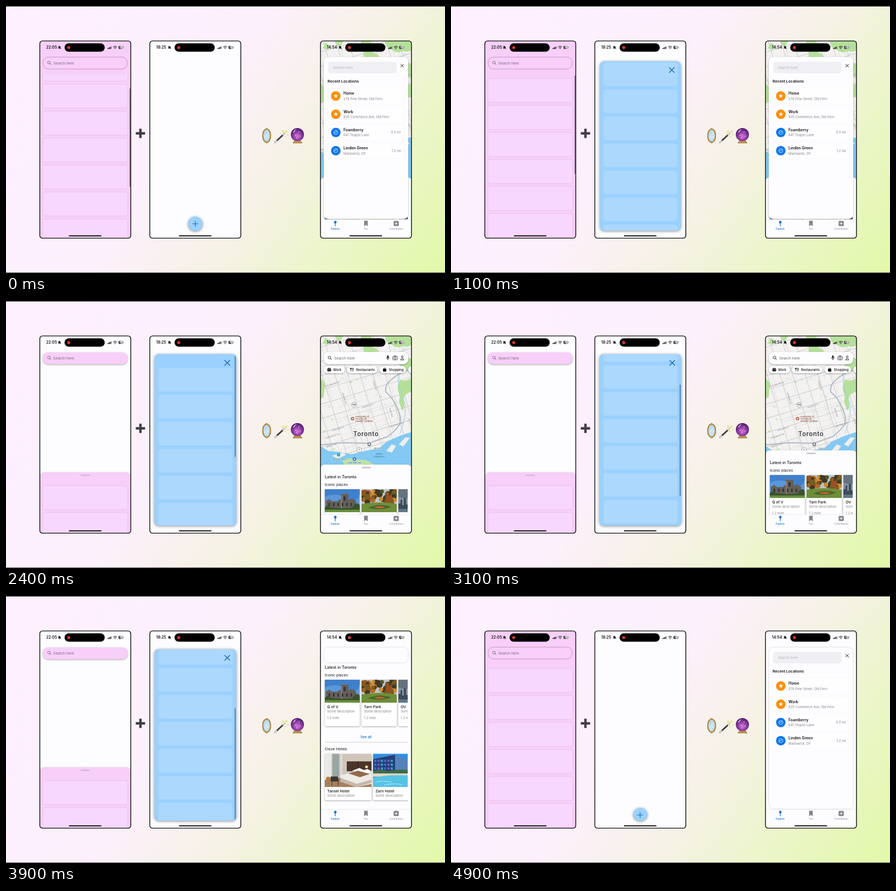
Recreate the animation shown at these times as an HTML page. Size 800x488 px, loop 5000 ms.

```html
<!DOCTYPE html>
<html lang="en">
<head>
<meta charset="utf-8">
<title>Sheets and search</title>
<style>
html, body { margin: 0; width: 100%; height: 100%; overflow: hidden; }
body { background: linear-gradient(125deg, #fef0ff 0, #fdf0fd 42%, #f5f2e3 64%, #ebf6c8 80%, #e2f8a8 100%); }
svg { display: block; }
text { font-family: Inter, "Noto Sans", sans-serif; white-space: pre; }
.sh { filter: drop-shadow(0 1px 1.5px #0005); }
.soft { filter: drop-shadow(0 .5px 1px #0002); }
</style>
</head>
<body>
<svg id="stage" width="800" height="488" viewBox="0 0 800 488"></svg>
<script>
const LOOP = 5000, STEP = 100;
const INK = '#111114', GREY = '#85858b', BLUE = '#0a72d8';

// ---- markup helpers
const rect = (x, y, w, h, r, fill, more = '') =>
  `<rect x="${x}" y="${y}" width="${w}" height="${h}" rx="${r}" fill="${fill}" ${more}/>`;
const circle = (x, y, r, fill, more = '') => `<circle cx="${x}" cy="${y}" r="${r}" fill="${fill}" ${more}/>`;
const path = (d, fill, more = '') => `<path d="${d}" fill="${fill}" ${more}/>`;
const line = (d, color, w, more = '') => `<path d="${d}" fill="none" stroke="${color}" stroke-width="${w}" ${more}/>`;
const text = (x, y, size, str, fill = INK, weight = 400, more = '') =>
  `<text x="${x}" y="${y}" font-size="${size}" fill="${fill}" font-weight="${weight}" ${more}>${str}</text>`;
const MID = 'text-anchor="middle"', END = 'text-anchor="end"', ROUND = 'stroke-linecap="round"';
const group = (id, body, more = '') => `<g id="${id}" ${more}>${body}</g>`;
const repeat = (n, fn) => Array.from({ length: n }, (_, i) => fn(i)).join('');

let seed = 41;
const rnd = () => (seed = seed * 16807 % 2147483647) / 2147483647;
const pick = list => list[Math.floor(rnd() * list.length)];

// ---- phone frame and status bar, drawn at the first phone's place
const glass = (x, y, color) =>
  circle(x, y, 2.5, 'none', `stroke="${color}" stroke-width=".8"`) +
  line(`M${x + 1.9} ${y + 1.9}l2 2`, color, .9, ROUND);

function status(time, charge) {
  const bell = path('M94.6 77.4q1-.8 1-2.2q.1-2 1.8-2.2q1.8.2 1.9 2.2q0 1.4 1 2.2zM96.6 77.9h1.7l-.8.8z', INK) +
    line('M94.7 72.8l5.6 5.8', INK, .7);
  const bars = repeat(4, i => rect(185 + i * 2.1, 76.8 - i * 1.1, 1.5, 1.8 + i * 1.1, .4, i > 2 ? '#8a878d' : INK));
  const wifi = line('M195.4 75q3.4-3.2 6.8 0', INK, 1) + line('M196.7 76.5q2.1-1.9 4.2 0', INK, 1) + circle(198.8, 78, .8, INK);
  const cell = rect(205, 72.7, 9, 5.8, 1.7, '#aaa7ad') + rect(205, 72.7, 4.6, 5.8, 1.7, '#3a3a3e') +
    rect(214.4, 74.6, .7, 2, .3, '#aaa7ad') + text(209.5, 77.3, 4.4, charge, '#fff', 700, MID);
  return text(73.3, 78.2, 6.9, time, INK, 600) + bell +
    rect(106.7, 68.3, 73.2, 15.2, 7.6, '#000') + circle(114.3, 76, 2.7, '#e2372f') + bars + wifi + cell;
}
const phone = (id, dx, time, charge, screen) =>
  `<clipPath id="${id}"><rect x="${61.5 + dx}" y="63.5" width="166" height="361" rx="5"/></clipPath>
  <g clip-path="url(#${id})">${rect(61 + dx, 63, 167, 362, 0, '#fdfcfe')}${screen}</g>
  <g transform="translate(${dx})">${status(time, charge)}${rect(114.5, 419.2, 59.5, 1.9, 1, '#000')}
  ${rect(61.6, 63.9, 165.8, 360.5, 5, 'none', 'stroke="#0b0b0c" stroke-width="1.4"')}</g>`;

// ---- pink phone: search bar over a pull-up sheet
const PINK = '#f7cff8';
const pinkScreen =
  rect(62, 313, 165.5, 400, 8, PINK, 'id="pinkSheet" class="soft"') +
  rect(136, 317, 17, 2.6, 1.3, '#d7b7db', 'id="pinkGrip"') +
  `<clipPath id="pinkClip"><rect id="pinkCut" x="60" width="170" height="400"/></clipPath>` +
  `<g clip-path="url(#pinkClip)">` +
  group('pinkList', repeat(10, i => rect(67.8, i * 49.3, 153.6, 42.8, 4, '#f7d7fd', 'class="soft"'))) + '</g>' +
  rect(225, 0, 1.7, 180, .8, '#8d7791', 'id="pinkThumb"') +
  rect(67.3, 94, 154, 21.5, 9, PINK, 'id="pinkBar" class="sh"') +
  rect(67.7, 93.4, 153.2, 21.8, 9.5, 'none', 'id="pinkLine" stroke="#bd86bd" stroke-width=".8"') +
  glass(78.3, 103.3, '#6d5670') + text(86, 106.6, 6.65, 'Search here', '#7d6880');

// ---- blue phone: round button that grows into a list
const blueScreen =
  rect(0, 0, 0, 0, 0, '#9ad1fe', 'id="blueBox" style="filter:drop-shadow(0 1.5px 2.5px #0007)"') +
  `<clipPath id="blueClip"><rect id="blueCut"/></clipPath><g clip-path="url(#blueClip)">` +
  group('blueList', repeat(11, i => rect(277.6, 103.5 + i * 49.3, 135.2, 43, 5, '#acd8fe'))) +
  rect(416.8, 100, 1.6, 204, .8, '#3a74ad', 'id="blueThumb"') + '</g>' +
  group('blueIcon', line('M-5 0H5M0-5V5', '#1767b4', 1.1, ROUND));

// ---- map
function map() {
  const streets = repeat(150, () => {
    const x = 540 + Math.round(rnd() * 46) * 5, y = 40 + Math.round(rnd() * 60) * 5, n = 15 + rnd() * 60;
    return `M${x} ${y}${rnd() < .5 ? 'h' : 'v'}${n.toFixed(1)}`;
  });
  const mains = repeat(12, i => `M520 ${40 + i * 25}h280M${530 + i * 22} 20v330`);
  const spots = repeat(60, () => rect(545 + rnd() * 220, 50 + rnd() * 240, 2 + rnd() * 5, 2 + rnd() * 3, .5,
    pick(['#c9e8b4', '#e9e4da', '#dfe6ea', '#c9e8b4'])));
  const label = (x, y, str, turn = -17) => text(x, y, 3.6, str, '#8b8b92', 500, `transform="rotate(${turn} ${x} ${y})"`);
  const tiny = (x, y, str, color) => text(x, y, 4, str, color, 600, `${MID} stroke="#fff" stroke-width=".6" paint-order="stroke"`);
  const shield = (x, y, str) => circle(x, y, 4.3, '#fff', 'stroke="#77777c" stroke-width=".7"') +
    text(x, y + 1.4, 3.8, str, '#444', 700, MID);
  const green = '#b5e09a';
  return rect(572, 62, 169, 262, 0, '#f3f2f0') +
    `<g transform="rotate(-17 656 190)">${spots}${line(streets, '#dededf', .7)}${line(mains, '#cfcfd3', 1.1)}</g>` +
    path('M648 62q-3 12 6 18q-6 12 2 16q10-4 16 6q10 4 14-2q-8-12-18-16q4-10-4-22z', green) +
    path('M690 64q2 14 14 16q8 8 20 2q8 4 16-2V62zM706 94q10-4 16 4l17 8v26q-12-4-14-12q-16-2-19-26zM600 62q0 10 9 12l7-12z', green) +
    path('M739 140q-10 8-20 4q-8 10-4 22q4 8 1 18l6 16q6-4 3-18q-2-12 14-16zM573 140l8 10l-2 26l-6 2zM583 68l7 4l-4 8l-9-3z', green) +
    line('M740 124q-26 8-38 20q-12 8-10 22q14 12 20 28q10 20 5 32q-8 12-22 22l-34 12l-45-1l-44 4', '#b0bac5', 2) +
    line('M722 92q-2 34-8 52q6 30 14 46q0 28-10 52', '#9acbea', 1) +
    path('M573 265l14 9l20 2l23 4l24-6l26-5l14-12l22-10l24-8V326H573z', '#83c9f3') +
    path('M693 274l10-12l8 3l-8 12zM716 262l12-13l8 1l-12 16zM594 283l20-6l6 4l-15 7z', '#eeeeea') +
    path('M613 292q12-8 26-2q18-2 30 8q10 8 30 14h-70q-10-8-16-20z', '#bfe2a5') +
    label(585, 112, 'DAVENPORT RD') + label(650, 196, 'BLOOR ST E') + label(595, 238, 'COLLEGE ST') +
    label(580, 158, 'ST CLAIR AVE W') + label(583, 252, 'DUNDAS ST W') + label(700, 231, 'EASTERN AVE') +
    label(584, 268, 'KING ST W') + label(733, 214, 'LESLIE ST', 73) + label(668, 146, 'YONGE ST', 73) +
    label(612, 168, 'SPADINA RD', 73) + label(698, 196, 'PAPE AVE', 73) +
    shield(634, 190, '11A') + shield(643.5, 272, '2') +
    circle(631.5, 215, 3.2, '#b4705c') + circle(631.5, 215, 1.2, '#fff') +
    ['University of', 'Toronto St.', 'George Campus'].map((s, i) => text(636.5, 212.5 + i * 4.4, 4.1, s, '#96604f', 600)).join('') +
    circle(662, 262, 3.4, '#747a86') + rect(660.6, 260.2, 2.8, 3, .6, '#fff') +
    circle(606, 281, 3.2, '#4caac2') + tiny(606, 290.5, 'Lakeside Park', '#36788e') +
    circle(635, 289, 3.4, '#3b78dd') + path('M635 286.8l1.6 4l-1.6-.8l-1.6.8z', '#fff') +
    tiny(635, 297, 'Dilly Marrow', '#2f66bd') +
    text(680, 281, 4, 'INNER', '#3e86b3', 500, MID) + text(680, 286, 4, 'HARBOUR', '#3e86b3', 500, MID) +
    tiny(677, 271, 'Toronto', '#687080') +
    text(656, 247, 11.4, 'Toronto', '#37373b', 600, `${MID} letter-spacing=".55" stroke="#fff" stroke-width="1.6" paint-order="stroke"`);
}

// ---- pictures on the cards
const photo = (x, y, w, h, body) => `<svg x="${x}" y="${y}" width="${w}" height="${h}">${body}</svg>`;
const campus = rect(0, 0, 64, 42, 0, '#5a97da') + path('M0 14q20-9 40 2T64 8V0H0z', '#3f80cc') +
  path('M2 38V22l6-4l5 4h10l3-3h3V9h14v10l6-2l8 4v17z', '#655f58') +
  path('M29 9v-2h2v2h3v-2h2v2h3v-2h2v2zM29 11h3v27h-3z', '#837a70') +
  repeat(6, i => rect(7 + i * 8, 25, 2.5, 6, 0, '#2e3036')) + rect(34, 13, 4, 8, 1, '#33363c') +
  path('M0 42V33q6-6 10 0q30 3 40 1q7-13 14-5v13z', '#38532d') + rect(0, 37.5, 64, 5, 0, '#69913c');
const autumn = rect(0, 0, 64, 42, 0, '#b9c6cc') +
  repeat(46, () => circle((rnd() * 64).toFixed(1), (3 + rnd() * 21).toFixed(1), (3 + rnd() * 3).toFixed(1),
    pick(['#b86a24', '#7a5a22', '#cf8a2e', '#4c5a2a', '#3f3a22', '#9d4f22']))) +
  path('M0 27q30-6 64 0v15H0z', '#6e8e3a') + path('M12 34q18-9 42-2q-18 8-42 2z', '#46652c') +
  path('M22 33q10-4 22 0q-10 4-22 0z', '#c2662f');
const skyline = rect(0, 0, 64, 42, 0, '#8393a2') + path('M0 0h30v12q-16 8-30 2z', '#65737f') +
  path('M0 42V26h4v-7h3v10h3V16h4v12h4v14z', '#3d4b58') + rect(0, 36, 64, 6, 0, '#60798a');
const bedroom = rect(0, 0, 86, 61, 0, '#cfc5ba') + rect(0, 0, 12, 52, 0, '#e9e9e6') + rect(14, 0, 12, 42, 0, '#9aa5a6') +
  rect(28, 0, 4, 50, 0, '#ded9d2') + rect(40, 14, 46, 18, 0, '#4b3429') + rect(60, 14, 1, 18, 0, '#2f2019') +
  path('M0 48l36-6l50 10v9H0z', '#a5805c') + path('M28 40l36-11l22 5v21l-28 6l-30-10z', '#eeeae6') +
  path('M28 44l30 11l28-8v6l-28 8l-30-10z', '#c5b7aa') + path('M50 31l13-5l8 4l-12 5zM66 31l12-3l7 4l-11 4z', '#fff') +
  path('M43 36l17-5l22 6l-18 6z', '#96694b') + path('M11 42h12l2 8h-14zM13 50v9M24 50v9', '#3a3835', 'stroke="#3a3835"') +
  circle(6, 46, 4, '#c07a3b') + circle(76, 24, 2.5, '#ffe2a0');
const pool = rect(0, 0, 86, 61, 0, '#2f8fe0') + path('M0 10l40-8v32H0z', '#233f78') +
  repeat(18, i => rect(2 + i % 6 * 6, 11 + Math.floor(i / 6) * 7, 4, 4, 0, ['#3f6ec6', '#7a56a8', '#3aa0c6'][i % 3])) +
  path('M40 2l26 10v24H40z', '#5682bb') + path('M0 32q14-6 26 0q20-6 60 0v8H0z', '#3f6a4a') +
  rect(0, 36, 86, 6, 0, '#e3d8c6') + path('M0 44q30-8 86-3v20H0z', '#57c3e4') +
  path('M4 52q14-4 30 0M20 57q20-4 34 0', 'none', 'stroke="#b5ebf6"');

const card = (x, y, w, ph, art, name, mile) =>
  rect(x, y, w, 85, 2.5, '#fff', 'class="sh"') + photo(x, y, w, ph, art) +
  text(x + 4.2, y + ph + 10, 6.85, name, INK, 500) + text(x + 4.2, y + ph + 18, 6.1, 'Some description', GREY) +
  (mile ? text(x + 4.2, y + ph + 30, 6.1, '1.2 mile', GREY) : '');
const feed =
  text(581, 25, 7.2, 'Latest in Toronto', INK, 500) + text(581, 38.5, 6.75, 'Iconic places') +
  `<svg x="576" y="40" width="156" height="230" viewBox="576 40 156 230">` +
  card(581, 45, 63.5, 42, campus, 'Q of V', 1) + card(648, 45, 64, 42, autumn, 'Tarn Park', 1) +
  card(715, 45, 64, 42, skyline, 'OV', 1) + text(656, 151.7, 6.3, 'See all', BLUE, 500, MID) +
  rect(581, 158.8, 152, .9, 0, '#c9c8cd') + text(581, 174, 6.8, 'Close Hotels') +
  card(581, 180.3, 85, 61, bedroom, 'Tansel Hotel') + card(669, 180.3, 85, 61, pool, 'Zarn Hotel') + '</svg>';

// ---- search panel
const star = (x, y) => path('M' + Array.from({ length: 10 }, (_, i) => {
  const a = i * Math.PI / 5, r = i % 2 ? 1.8 : 4.3;
  return `${(x + r * Math.sin(a)).toFixed(2)} ${(y - r * Math.cos(a)).toFixed(2)}`;
}).join('L') + 'z', '#fff');
const clock = (x, y) => circle(x, y, 3.6, 'none', 'stroke="#fff" stroke-width=".8"') +
  line(`M${x + 1.8} ${y - 1.8}L${x} ${y}h-1.8`, '#fff', .8, ROUND);
const places = [
  ['Home', '274 Pine Street, Old Fern', ''],
  ['Work', '835 Commerce Ave, Old Fern', ''],
  ['Foamberry', '641 Teapot Lane', '0.5 mi'],
  ['Linden Green', 'Marlowick, OF', '1.2 mi']
];
const recent =
  rect(587, 102.3, 125, 20.6, 4.5, '#f0eff3') + text(596, 115, 6.35, 'Search here', '#b3b3b9') +
  line('M719.2 106.4l5.4 5.4m0-5.4l-5.4 5.4', INK, .9, ROUND) +
  text(586, 140, 6.85, 'Recent Locations', INK, 600) +
  places.map(([name, where, far], i) => {
    const y = 164.5 + i * 33.3;
    return rect(586.5, y - 14.5, 139.5, 29, 3, '#fefdff', 'stroke="#f4f2f6" stroke-width=".6"') +
      circle(601, y, 8.7, i < 2 ? '#fc8f0d' : '#0a76f2') + (i < 2 ? star : clock)(601, y) +
      text(615, y - 2.2, 6.9, name, INK, 600) + text(615, y + 7.2, 6, where, GREY) +
      text(719.3, y + 2.2, 6.2, far, GREY, 400, END);
  }).join('');

const barItems = glass(589.5, 103.3, INK) + text(598, 106.6, 6.6, 'Search here', '#68686d') +
  rect(694.6, 99.6, 2.6, 5, 1.3, INK) + line('M693.4 103q.2 3 2.5 3t2.5-3M695.9 106v2', INK, .8) +
  rect(705, 101, 8, 6.6, 1.4, 'none', `stroke="${INK}" stroke-width=".8"`) + circle(709, 104.3, 1.7, 'none', `stroke="${INK}" stroke-width=".7"`) +
  rect(707.5, 99.9, 3, 1.2, .4, INK) +
  circle(722, 102, 1.7, 'none', `stroke="${INK}" stroke-width=".8"`) + line('M719 107.8q.2-2.6 3-2.6t3 2.6z', INK, .8);
const chip = (x, w, str, icon) => rect(x, 119, w, 13, 6.5, '#fff', 'class="sh"') + icon + text(x + 17, 127.6, 5.95, str, INK, 500);
const chips =
  chip(579, 38.5, 'Work', rect(585.5, 123.6, 7, 5, 1, INK) + rect(587.3, 122.3, 3.4, 2, .6, 'none', `stroke="${INK}" stroke-width=".7"`) + rect(585.5, 125.6, 7, .5, 0, '#fff')) +
  chip(621, 55.5, 'Restaurants', line('M628.6 122v7M627.3 122v2.2h2.6V122M632 129v-6.8q1.4 1.4.8 4H632', INK, .8)) +
  chip(680.5, 48.5, 'Shopping', rect(687, 123.8, 6, 5.2, .8, INK) + line('M688.6 124v-1.2q1.4-1.4 2.8 0v1.2', INK, .7)) +
  chip(733, 40, 'Hotels', '');

const tabs = rect(573, 390, 167, 35, 0, '#fdfcfe') + rect(573, 389.7, 167, .7, 0, '#e2e1e6') +
  circle(600, 395, 2.4, '#0d68cd') + circle(599.3, 394.3, .8, '#8fc2fa') + rect(599.4, 397, 1.2, 5.6, .6, '#0d68cd') +
  path('M652.6 392.4h6.6v10.4l-3.3-2.7l-3.3 2.7z', '#858589') +
  rect(706.4, 392.8, 9.4, 9.4, 1.8, '#858589') + line('M711.1 395v5M708.6 397.5h5', '#fff', 1.1) +
  text(600, 408.7, 4.4, 'Explore', BLUE, 500, MID) + text(655.8, 408.7, 4.4, 'You', '#8b8b90', 400, MID) +
  text(711, 408.7, 4.4, 'Contribution', '#8b8b90', 400, MID);

const mapScreen = map() +
  rect(573, 313, 166.5, 420, 8, '#fdfcfe', 'id="mapSheet" class="soft"') +
  rect(648, 303, 17, 2.6, 1.3, '#c6c5ca', 'id="mapGrip"') + group('feed', feed) + group('chips', chips) +
  rect(579, 93.3, 154, 22, 8.5, '#fdfcfe', 'id="panelShade" class="sh"') +
  rect(579, 93.3, 154, 22, 8.5, '#fdfcfe', 'id="panel" stroke="#dddce1" stroke-width=".8"') +
  group('barItems', barItems) + `<clipPath id="panelClip"><rect id="panelCut" x="579" y="93.3" width="154"/></clipPath>` +
  `<g clip-path="url(#panelClip)">${group('recent', recent)}</g>` + tabs;

// ---- plus sign and the three charms
const spark = (x, y, r) => path(`M${x} ${y - r}l${r * .3} ${r * .7}l${r * .7} ${r * .3}l${-r * .7} ${r * .3}l${-r * .3} ${r * .7}l${-r * .3} ${-r * .7}l${-r * .7} ${-r * .3}l${r * .7} ${-r * .3}z`, '#e6dc72');
const charms =
  line('M236.5 232.7h17M245 224.2v17', '#413f45', 4.4) +
  path('M475 223.2q3 2 5 3.6q3 4 2.7 10.2q.3 6.2-2.7 10.2q-2 1.8-5 3.6q-3-1.8-5-3.6q-3-4-2.7-10.2q-.3-6.2 2.7-10.2q2-1.6 5-3.6z', '#b98a3b', 'stroke="#8a6427" stroke-width=".5"') +
  `<ellipse cx="475" cy="237" rx="5.9" ry="10.8" fill="#b9dcf3"/>` + line('M471 241l7-9M473 244l6-7', '#e4f3fc', 1.5) +
  line('M490.2 249.3L507.6 233', '#3a393e', 2.9, ROUND) + line('M490.2 249.3l2.8-2.6M505 235.5l2.6-2.5', '#dcdae0', 2.5, ROUND) +
  spark(505, 229, 2.8) + spark(511, 229.5, 3) + spark(513.5, 235.5, 2.2) + spark(509, 238.5, 1.8) + spark(502.5, 232.5, 1.6) +
  path('M523 250.5q1-3 3-4.5h10q2.500 1.500 3.500 4.500z', '#c3964c', 'stroke="#7d5622" stroke-width=".6"') +
  `<radialGradient id="orb" cx=".5" cy=".62" r=".55"><stop offset="0" stop-color="#d77bdc"/><stop offset=".55" stop-color="#9340a5"/><stop offset="1" stop-color="#542170"/></radialGradient>` +
  circle(531, 235, 12, 'url(#orb)') + path('M523 231q2-5 7-6q-4 3-5 6z', '#eab9ee') +
  [[527, 236], [534, 230], [536, 238], [530, 241]].map(([x, y]) => circle(x, y, .8, '#f8d9fa')).join('');

stage.innerHTML = rect(0, 0, 800, .9, 0, '#111') + rect(0, 487.2, 800, .8, 0, '#222') + charms +
  phone('p1', 0, '22:05', '50', pinkScreen) + phone('p2', 200.5, '18:25', '47', blueScreen) +
  phone('p3', 511.5, '14:54', '67', mapScreen);

// ---- motion: [ms, value] steps joined by a monotone curve
const tracks = {
  pinkTop: [[1200, 108], [1500, 230], [1800, 313], [4050, 313], [4350, 170], [4600, 108]],
  pinkScroll: [[0, 39], [400, 115], [600, 105], [1000, 0], [4900, 0]],
  pinkThumb: [[1900, 1], [2200, 0]],
  blueOpen: [[500, 0], [700, .25], [900, .86], [1100, .986], [1300, 1], [4050, 1], [4300, .5], [4500, .08], [4700, -.012], [4900, -.008]],
  blueScroll: [[2000, 0], [2400, -19], [2600, 0], [3100, 84.8], [3600, 169]],
  blueThumb: [[2100, 0], [2300, 1], [4000, 1], [4200, 0]],
  mapTop: [[2250, 313], [2400, 299], [3100, 273], [3350, 190], [3700, 108]],
  panel: [[1920, 1], [2150, .3], [2350, 0], [3800, 0], [3900, .025], [4150, .7], [4450, 1]]
};
function at(name, t) {
  const k = tracks[name], n = k.length - 1;
  if (t <= k[0][0]) return k[0][1];
  if (t >= k[n][0]) return k[n][1];
  const i = k.findIndex(s => s[0] > t) - 1;
  const slope = j => j < 0 || j >= n ? 0 : (k[j + 1][1] - k[j][1]) / (k[j + 1][0] - k[j][0]);
  const tangent = j => {
    const a = slope(j - 1), b = slope(j);
    return a * b > 0 ? 2 * a * b / (a + b) : 0;
  };
  const h = k[i + 1][0] - k[i][0], u = (t - k[i][0]) / h, v = 1 - u;
  return k[i][1] * (1 + 2 * u) * v * v + k[i + 1][1] * u * u * (3 - 2 * u) +
    h * (tangent(i) * u * v * v - tangent(i + 1) * u * u * v);
}
const $ = id => document.getElementById(id);
const set = (id, attrs) => { for (const a in attrs) $(id).setAttribute(a, attrs[a]); };
const clamp = v => Math.max(0, Math.min(1, v));
const mix = (a, b, p) => a + (b - a) * p;

function sheet(name, top) {
  const full = clamp((200 - top) / 92);
  set(name + 'Sheet', { y: top - 44 * full, rx: 8 * (1 - full) });
  set(name + 'Grip', { y: top + 4.2, opacity: 1 - full });
  return full;
}

function draw(t) {
  const top = at('pinkTop', t), full = sheet('pink', top), roll = at('pinkScroll', t);
  set('pinkCut', { y: top + 17 });
  set('pinkList', { transform: `translate(0 ${top + 25 - roll})` });
  set('pinkThumb', { y: top + 19 + roll * .6, opacity: at('pinkThumb', t) });
  set('pinkBar', { opacity: 1 - full });
  set('pinkLine', { opacity: full });

  const p = at('blueOpen', t), s = at('blueScroll', t);
  const box = { x: mix(332, 270.6, p), y: mix(385, 97, p), width: mix(26, 149, p), height: mix(26, 313.5, p), rx: mix(13, 8, clamp(p)) };
  set('blueBox', box);
  set('blueCut', box);
  set('blueList', { transform: `translate(0 ${-s})`, opacity: clamp((p - .3) / .5) });
  set('blueThumb', { y: 100 + Math.max(0, s) * 105 / 169, height: 204 + Math.min(0, s), opacity: at('blueThumb', t) });
  set('blueIcon', { transform: `translate(${mix(345, 403.2, p)} ${mix(398, 113, p)}) rotate(${45 * p}) scale(${mix(1, 1.3, p)})` });

  const mapTop = at('mapTop', t), up = sheet('map', mapTop), open = at('panel', t);
  const height = mix(22, 296, open);
  set('feed', { transform: `translate(0 ${mapTop})` });
  set('chips', { opacity: (1 - up) * clamp(1 - open * 4) });
  set('panelShade', { height, opacity: 1 - up });
  set('panel', { height, 'stroke-opacity': up });
  set('panelCut', { height });
  set('barItems', { opacity: clamp(1 - open * 40) });
  set('recent', { opacity: clamp((open - .25) / .5) });
}

const start = performance.now();
function tick() {
  const t = (performance.now() - start) % LOOP;
  draw(Math.floor(t / STEP) * STEP);
  requestAnimationFrame(tick);
}
tick();
</script>
</body>
</html>
```
